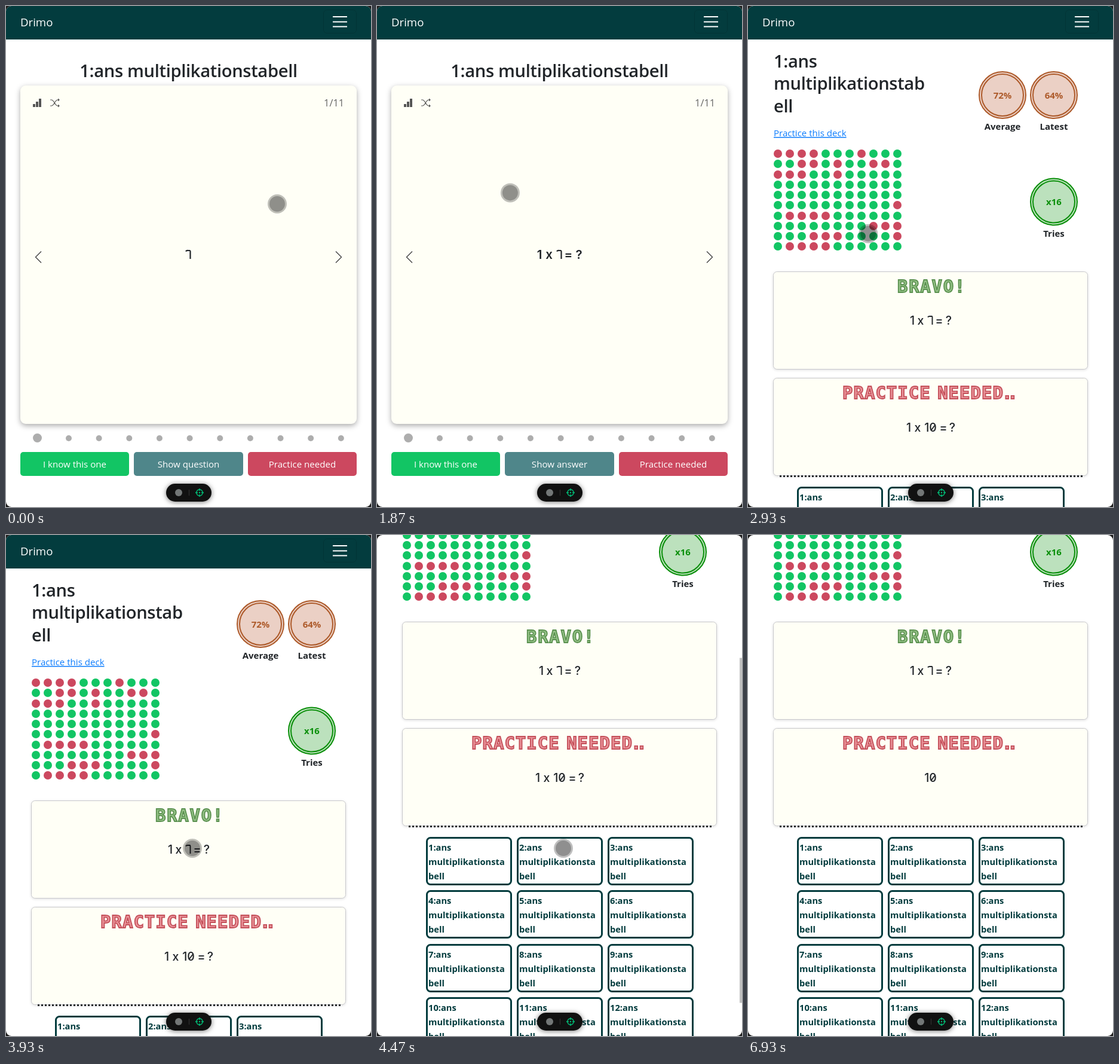
Recreate the animation shown at these times as an HTML page. Size 611 px wide and 838 px high, loop 7870 ms.

```html
<!DOCTYPE html>
<html lang="sv">
<head>
<meta charset="utf-8">
<title>Flashcards</title>
<style>
  html, body { margin: 0; width: 100%; height: 100%; overflow: hidden; background: #1d1d1d; }
  svg { display: block; width: 611px; height: 838px; background: #fff; border-radius: 9px; }
  text { font: 15.1px "Open Sans", "Noto Sans", sans-serif; fill: #212529; white-space: pre; }
  .mid { text-anchor: middle; }
  .bold { font-weight: 700; font-size: 15px; }
  .title { font-weight: 600; font-size: 29.2px; letter-spacing: -.35px; }
  .label { fill: #fff; }
  .eq text { font: 500 19.5px Inter, sans-serif; text-anchor: middle; }
  .eq path { fill: none; stroke: #212529; stroke-width: 1.9; }
  .eq.strong text { font-weight: 600; font-size: 20.5px; }
  .eq.strong path { stroke-width: 2.2; }
  .deck text { font-weight: 700; font-size: 14.7px; fill: #033c3e; }
  .deck rect { fill: #fff; stroke: #033c3e; stroke-width: 3; }
  .head { font: 700 29px "DejaVu Sans Mono", monospace; letter-spacing: 1px; word-spacing: -7px; stroke-width: 1.8; }
  .panel { fill: #fffff6; stroke: #c9c9cd; filter: drop-shadow(0 1px 2px #0002); }
</style>
</head>
<body>
<svg viewBox="0 0 611 838">
  <g id="stats"></g>
  <g id="card"></g>
  <rect id="bar" x="607" width="4" height="577" fill="#c1c1c1"/>
  <g id="pill">
    <rect x="268" y="799" width="76" height="30" rx="15" fill="#111" style="filter:drop-shadow(0 1px 4px #0008)"/>
    <circle cx="289" cy="814" r="6" fill="#737777"/>
    <path d="M306.5 809v10" stroke="#333"/>
    <g fill="none" stroke="#00bd77" stroke-width="1.4">
      <circle cx="324" cy="814" r="5.2"/>
      <path d="M324 807v4m0 6v4M317 814h4m6 0h4"/>
      <circle cx="324" cy="814" r=".5"/>
    </g>
  </g>
  <g id="touch" fill-opacity=".25"><circle r="16"/><circle r="13"/></g>
  <path id="arrow" d="M50.5 164.5v16l3.7-3.5 2.4 5.6 2.4-1-2.3-5.5h5z" fill="#fff" stroke="#000"/>
</svg>
<script>
const $ = id => document.getElementById(id);
const range = (n, f) => Array.from({ length: n }, (_, i) => f(i)).join('');
const text = (x, y, s, cls = '', attr = '') => `<text x="${x}" y="${y}" class="${cls}" ${attr}>${s}</text>`;
const rect = (x, y, w, h, r, attr) => `<rect x="${x}" y="${y}" width="${w}" height="${h}" rx="${r}" ${attr}/>`;
const dot = (x, y, r, fill, attr = '') => `<circle cx="${x}" cy="${y}" r="${r}" fill="${fill}" ${attr}/>`;

const GREEN = '#12c564', RED = '#cc485f', DARK = '#033c3e';

const navbar = rect(0, 0, 611, 56, 0, `fill="${DARK}"`)
  + text(24, 34, 'Drimo', 'label', 'style="font-size:18.6px"')
  + rect(531.5, 6.5, 55, 39, 6, 'fill="none" stroke="#0002"')
  + '<path d="M547 18h24m-24 8.5h24m-24 8h24" stroke="#fff" stroke-width="2"/>';

// The answer stays in place while the rest of the equation is toggled.
const equation = (id, y, [one, x, equals, mark], answer, cls = '') => `<g class="eq ${cls}">
  <g id="${id}">${text(one, y, '1')}${text(x, y, 'x')}${text(equals, y, '=')}${text(mark, y, '?')}</g>${answer}</g>`;
const seven = y => `<path d="M301 ${y - 12.5}q1-1.8 4-1.5h2.5q1 0 1 1.5v12.5"/>`;
const ten = text(305.5, 712, '10') + '<path d="M307 709l6-8"/>';

const button = (x, w, fill, label, id) => rect(x, 746, w, 40, 5, `fill="${fill}"`)
  + text(x + w / 2, 772, label, 'label mid', `id="${id}"`);

$('card').innerHTML = navbar
  + text(305.5, 118.5, '1:ans multiplikationstabell', 'title mid')
  + rect(24, 133, 563, 566, 9, 'fill="#fffff6" style="filter:drop-shadow(0 3px 5px #0005)"')
  + '<path d="M45 164h4v5h-4zm5-4h4v9h-4zm5-5h4v14h-4z" fill="#555"/>'
  + `<g fill="none" stroke="#555" stroke-width="1.2">
      <path d="M74 157h2c4.5 0 6 10 10.5 10h2M74 167h2c4.5 0 6-10 10.5-10h2"/>
      <path d="M87 154.5l3 2.5-3 2.5zm0 10l3 2.5-3 2.5z" fill="#555" stroke="none"/>
      <path d="M59 410.5l-9.5 9.5 9.5 9.5M552 410.5l9.5 9.5-9.5 9.5" stroke="#444" stroke-width="1.4"/></g>`
  + text(566, 168, '1/11', '', 'text-anchor="end" style="font-size:16.3px;fill:#666"')
  + equation('cardQ', 423, [272, 288, 320.5, 338], seven(423), 'strong')
  + dot(52.5, 722.5, 7.5, '#adadad')
  + range(10, i => dot(105 + 50.65 * i, 723, 5, '#adadad'))
  + button(24, 182, GREEN, 'I know this one', 'know')
  + button(214, 183, '#4f868a', 'Show question', 'flip')
  + button(405, 182, RED, 'Practice needed', 'practice');

const badge = (x, y, value, label, color, fill) => dot(x, y, 39, fill, `stroke="${color}" stroke-width="2"`)
  + dot(x, y, 35, 'none', `stroke="${color}" stroke-width="2"`)
  + text(x, y + 5.5, value, 'bold mid', `style="fill:${color}"`)
  + text(x, y + 58, label, 'bold mid');

const panel = y => rect(42.5, y, 526, 163, 6, 'class="panel"');
const misses = ['01237', '23589', '0125', '', '', 'a', '1234', '89a', '345a', '1234'];
const BRONZE = ['#ad5a2a', '#ebd0c5'];

const deck = i => {
  const x = 83.5 + 152 * (i % 3), y = 805.5 + Math.round(89.4 * Math.floor(i / 3));
  return `<g class="deck">${rect(x, y, 141, 78, 6, '')}`
    + [i + 1 + ':ans', 'multiplikationsta', 'bell'].map((s, n) => text(x + 2.5, y + 21.5 + 24 * n, s)).join('') + '</g>';
};

$('stats').innerHTML = navbar
  + ['1:ans', 'multiplikationstab', 'ell'].map((s, i) => text(43, 102.5 + 37.5 * i, s, 'title')).join('')
  + text(43, 218, 'Practice this deck', '', 'style="fill:#0d7dfd;text-decoration:underline"')
  + misses.map((row, j) => range(11, i =>
      dot(50 + 20 * i, Math.round(247.2 + 17.25 * j), 7, row.includes(i.toString(16)) ? RED : GREEN))).join('')
  + badge(426, 149, '72%', 'Average', ...BRONZE)
  + badge(512, 149, '64%', 'Latest', ...BRONZE)
  + badge(512, 327.5, 'x16', 'Tries', '#0a8f0a', '#bce1bd')
  + panel(444.5) + panel(622.5)
  + text(250, 479, 'BRAVO!', 'head', 'style="fill:#94c186;stroke:#5b9150;letter-spacing:1.7px"')
  + text(158, 657, 'PRACTICE NEEDED<tspan dx="-3" style="letter-spacing:-8px">..</tspan>', 'head',
      'style="fill:#ea949a;stroke:#c4505a"')
  + equation('firstQ', 533, [275, 289, 320, 336], seven(533))
  + equation('secondQ', 712, [269, 284, 327, 342], ten)
  + '<path d="M53 786.5h507" stroke="#212529" stroke-width="3" stroke-dasharray="3 3"/>'
  + range(12, deck);

// Pointer path: step (15 per second), x, y
const path = [
  [1, 454, 331], [4, 343, 415], [24, 343, 415], [33, 55, 169], [39, 55, 169], [48, 306, 532],
  [51, 312, 524], [70, 312, 524], [76, 421, 412], [98, 421, 412], [103, 215, 824], [104, 190, 900]
];
const ease = p => { p = Math.min(1, Math.max(0, p)); return p * p * (3 - 2 * p); };
const show = (id, on) => $(id).setAttribute('visibility', on ? 'inherit' : 'hidden');

function pointer(k) {
  const i = path.findIndex(p => p[0] > k);
  if (i < 1) return path[i < 0 ? path.length - 1 : 0].slice(1);
  const [a, x, y] = path[i - 1], [b, u, v] = path[i];
  const p = ease((k - a) / (b - a));
  return [x + (u - x) * p, y + (v - y) * p];
}

function draw(now) {
  const k = Math.floor((now % 7870 + 4) * .015);
  const asking = k >= 6 && !(k >= 12 && k < 18);
  const scroll = 299 * ease((k - 63) / 4);
  show('card', k < 37);
  show('stats', k >= 37);
  show('cardQ', asking);
  $('flip').textContent = asking ? 'Show answer' : 'Show question';
  show('firstQ', k < 54 || k >= 59);
  show('secondQ', k < 78 || (k >= 85 && k < 91));
  $('stats').setAttribute('transform', `translate(0 ${-scroll})`);
  show('bar', scroll > 0 && k < 73);
  $('bar').setAttribute('y', scroll * .6875);
  show('arrow', k === 36);
  show('touch', k !== 36 && k < 104);
  $('touch').setAttribute('transform', `translate(${pointer(k)})`);
}

const start = performance.now();
(function tick() {
  draw(performance.now() - start);
  requestAnimationFrame(tick);
})();
</script>
</body>
</html>
```
